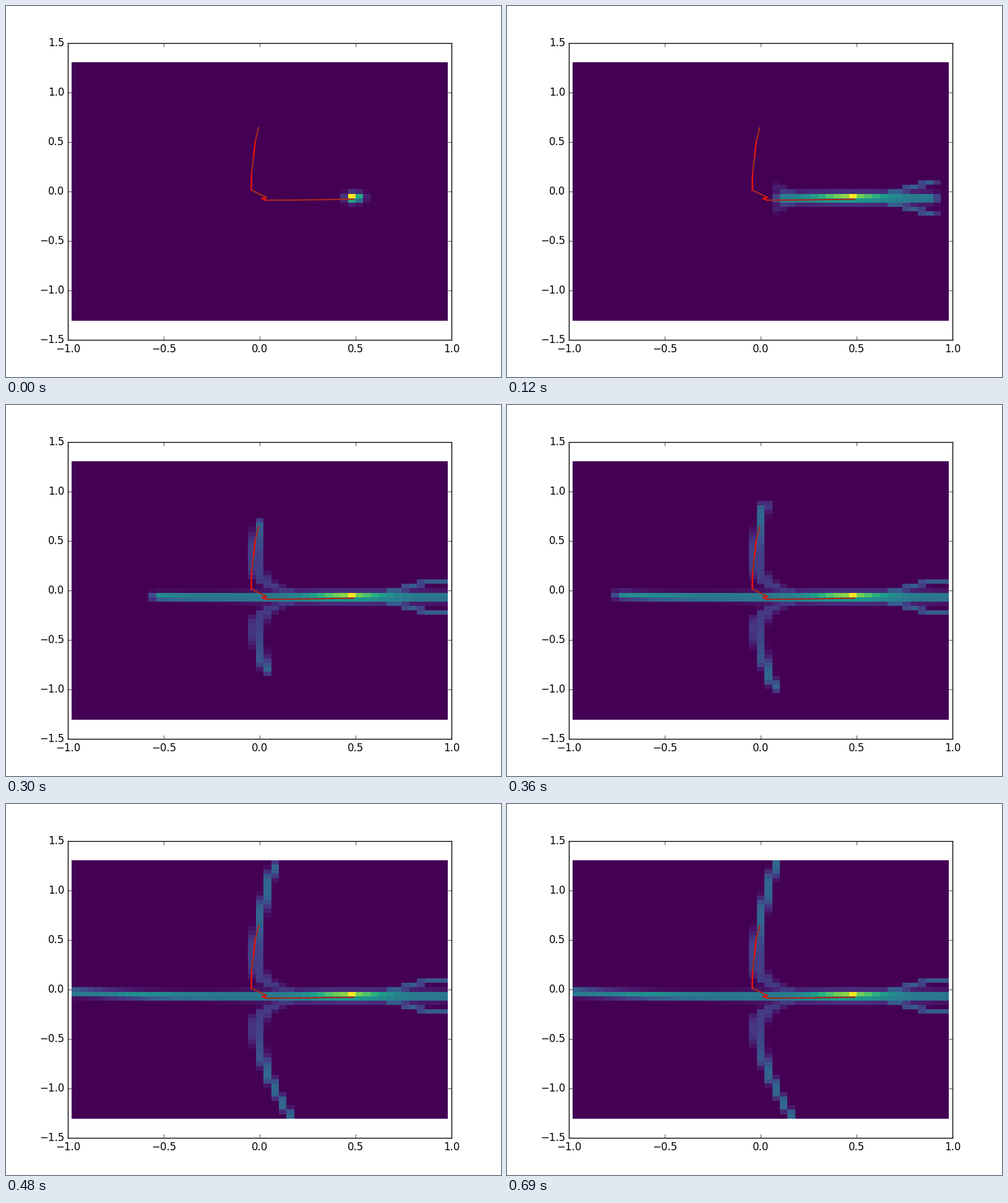
A matplotlib script that plays this animation: 800x600 px, repeating every 0.72 s.

```python
import numpy as np
import matplotlib.pyplot as plt
from matplotlib.animation import FuncAnimation

FRAMES, INTERVAL = 24, 30
COLS, ROWS = 49, 59
MID = 61  # row r mirrors row MID - r

plt.rcParams.update({
    "font.family": "DejaVu Sans", "font.size": 12, "axes.linewidth": 1.0,
    "xtick.direction": "in", "ytick.direction": "in",
    "xtick.top": True, "ytick.right": True,
    "xtick.major.size": 4, "ytick.major.size": 4,
    "xtick.major.width": 0.5, "ytick.major.width": 0.5,
    "xtick.major.pad": 4, "ytick.major.pad": 4,
    "ytick.alignment": "center",
})

col = np.arange(COLS)
C, R = np.meshgrid(col, np.arange(ROWS))


def bump(x, center, width, power=2):
    return np.exp(-np.abs((x - center) / width) ** power)


def smoothstep(x):
    x = np.clip(x, 0, 1)
    return x * x * (3 - 2 * x)


def arm(v, bend):
    """Branch leaving the trunk; v counts rows away from it."""
    d = np.maximum(v, 0)
    center = 23.2 + 4 * np.exp(-d / 2) + bend * d ** 2
    width = .6 + .9 * np.exp(-d / 7)
    height = .17 + .16 * np.minimum(d / 16, 1) ** 2
    return height * bump(C, center, width, 4) * (v >= 0)


def fork(r):
    """Thin branch that leaves the trunk on the right and levels off."""
    center = 29.4 - 2.4 * smoothstep((C - 40) / 7)
    return .29 * bump(r, center, .65, 4) * (C >= 41)


def final_heat():
    heat = np.zeros((ROWS, COLS))
    heat[30] = (.4 + .1 * bump(col, 9, 5) + .43 * bump(col, 35.5, 4.5)
                + .17 * (col == 36))
    heat[31] = .38 / (1 + np.exp((7 - col) / 3)) + .16 * bump(col, 35, 6)
    heat[32] = .13 * bump(col, 36, 12)
    heat[29] = heat[32] + .3 * np.exp(-col / 5)
    branches = [fork(R), fork(MID - R), arm(29 - R, .0033), arm(R - 32, .0071)]
    return np.maximum.reduce([heat] + branches)


HEAT = final_heat()
SEED = np.zeros_like(HEAT)
spot = [.16, 1, .6, .08]
SEED[29:33, 35:39] = np.outer(spot, spot)


def reveal(distance):
    return np.clip(.5 + .5 * np.round(distance), 0, 1)


def heat_at(i):
    if i == 0:
        return SEED
    left = 35.8 - 2.55 * i
    right = 38 + 2.25 * i
    top = min(28, 26 - 2.15 * (i - 4))
    return (HEAT * reveal(C - left) * reveal(right - C)
            * reveal(R - top) * reveal(MID - top - R))


fig = plt.figure(figsize=(8, 6), dpi=100, facecolor="white")
ax = fig.add_axes([.125, .1, .775, .8])
ax.set(xlim=(-1, 1), ylim=(-1.5, 1.5))
ax.set_xticks(np.arange(-1, 1.1, .5))
ax.set_yticks(np.arange(-1.5, 1.6, .5))

mesh = ax.pcolormesh(np.linspace(-.98, .98, COLS + 1),
                     np.linspace(1.304, -1.304, ROWS + 1),
                     SEED, cmap="viridis", vmin=0, vmax=1)

path = np.array([(-.005, .645), (-.024, .5), (-.032, .35), (-.042, .19),
                 (-.044, .015), (.035, -.06), (.012, -.072), (.035, -.088),
                 (.2, -.086), (.49, -.078)])
ax.plot(*path.T, color="#a8291c", lw=1.6, zorder=3)
for part in (path[1:3], path[3:5], path[5:8]):
    ax.plot(*part.T, color="#e8100e", lw=1.6, zorder=4)


def draw(i):
    mesh.set_array(heat_at(i))
    return [mesh]


anim = FuncAnimation(fig, draw, frames=FRAMES, interval=INTERVAL,
                     repeat=True, repeat_delay=0, blit=False)
plt.show()
```
